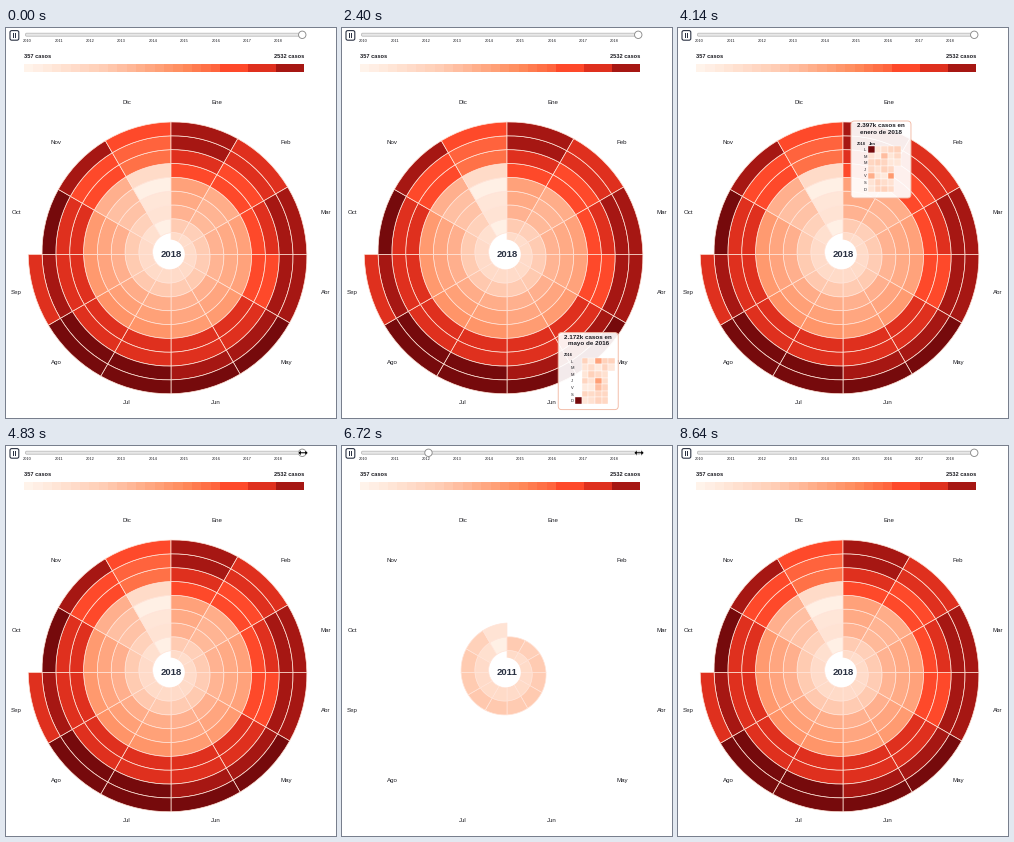
These frames come from a looping animation (330 px wide and 390 px high, 8670 ms). A matplotlib script:

```python
import random

import matplotlib.pyplot as plt
import numpy as np
from matplotlib.animation import FuncAnimation
from matplotlib.collections import PolyCollection
from matplotlib.colors import LinearSegmentedColormap
from matplotlib.patches import Circle, FancyBboxPatch, Polygon, Rectangle
from matplotlib.transforms import Affine2D

W, H, DPI = 330, 390, 100
STEP, FRAMES = 30, 289
PX = 72 / DPI
CX, CY = 165, 226.4
R0, PITCH = 21.7, 13.84
TOTAL = 105  # months from January 2010 to September 2018
INK, NAVY = "#1c1c22", "#2a3142"

MONTHS = ["enero", "febrero", "marzo", "abril", "mayo", "junio", "julio",
          "agosto", "septiembre", "octubre", "noviembre", "diciembre"]
HEAT = LinearSegmentedColormap.from_list("heat", [
    (0, "#fff3ea"), (3 / 11, "#ffcbb2"), (6 / 11, "#ff8a5a"), (8 / 11, "#ff4a2a"),
    (9 / 11, "#e0301e"), (10 / 11, "#a61713"), (1, "#760a0c")])

fig = plt.figure(figsize=(W / DPI, H / DPI), dpi=DPI, facecolor="white")
ax = fig.add_axes([0, 0, 1, 1])
ax.set_xlim(0, W)
ax.set_ylim(H, 0)
ax.axis("off")


def month_days(i):
    year, m = divmod(i, 12)
    if m == 1:
        return 29 if year % 4 == 2 else 28
    return 30 if m in (3, 5, 8, 10) else 31


def heat_level(i):
    """Yearly growth, a summer peak, a December drop, scaled by month length."""
    year, m = divmod(i, 12)
    base = np.interp(year, [0, 2, 4, 5, 6, 7, 8],
                     [1.8, 4.2, 5.1, 8.6, 8.82, 10.1, 10.6])
    season = 0.08 * year * np.cos(np.pi * (m - 7) / 6)
    drop = 1.5 + 3 * np.exp(-((year - 3) / 1.3) ** 2)
    winter = drop * max(0, (m - 7) / 4) ** 5
    unfinished = 0.8 if i == TOTAL - 1 else 1
    level = (base + season - winter) * month_days(i) / 30.4 * unfinished
    return float(np.clip(level, 0.3, 11))


def shade(level):
    level = np.asarray(level, float)
    return HEAT(np.where(level < 7.5, level, np.round(level)) / 11)


def label(x, y, s, size, **kw):
    style = dict(fontsize=size * PX, color=INK, family="Liberation Sans",
                 ha="center", va="baseline")
    style.update(kw)
    return ax.text(x, y, s, **style)


def rounded(x, y, w, h, r, **kw):
    style = f"round,pad=0,rounding_size={r}"
    return ax.add_patch(FancyBboxPatch((x, y), w, h, boxstyle=style, **kw))


def polar(r, a):
    return CX + r * np.sin(a), CY - r * np.cos(a)


def spiral_cell(i):
    t = np.linspace(i, i + 1, 9) / 12
    outer = R0 + PITCH * t
    r = np.concatenate([outer, outer[::-1] - PITCH])
    a = 2 * np.pi * np.concatenate([t, t[::-1]])
    return np.column_stack(polar(r, a))


def box(x, y, size):
    return [(x, y), (x + size, y), (x + size, y + size), (x, y + size)]


# Slider
rounded(4, 2.6, 8.8, 9.6, 1.8, fc="white", ec=NAVY, lw=1.1 * PX)
for x in (6.5, 9.2):
    ax.add_patch(Rectangle((x, 5), 1.1, 4.8, fc=NAVY, lw=0))
rounded(19.5, 5.2, 279, 3, 1.2, fc="#e8e8e8", ec="#b9b9b9", lw=0.8 * PX)
for k in range(9):
    label(21.5 + 31.4 * k, 14, str(2010 + k), 4)
knob = ax.add_patch(Circle((296, 6.8), 3.7, fc="white", ec="#8c8c8c",
                           lw=0.9 * PX, zorder=4))

# Legend
label(17.5, 30.4, "357 casos", 5.7, ha="left", weight="bold")
label(298.5, 30.4, "2532 casos", 5.6, ha="right", weight="bold")
BARS = 30
for k in range(BARS):
    w = 280 / BARS
    ax.add_patch(Rectangle((18 + k * w, 36.4), w, 7.6, lw=0, antialiased=False,
                           fc=shade(10.4 * k / (BARS - 1))))

# Spiral
levels = [heat_level(i) for i in range(TOTAL)]
cell_shapes = [spiral_cell(i) for i in range(TOTAL)]
cell_colors = shade(levels)
spiral = PolyCollection(cell_shapes, facecolors=cell_colors,
                        edgecolors="#ffe4d8", linewidths=0.7 * PX, zorder=2)
ax.add_collection(spiral, autolim=False)
ax.add_patch(Circle((164, CY), 14.8, fc="white", lw=0, zorder=3))
year_text = label(CX, 228.6, "2018", 9.5, weight="bold", color=NAVY, zorder=4)

for m, name in enumerate(MONTHS):
    x, y = polar(155, np.radians(15 + 30 * m))
    label(x, y - 0.5, name[:3].title(), 6.1, ha="left" if m < 6 else "right")

# Resize cursor
half = np.array([(5, 0), (2, -3), (2, -0.8), (-2, -0.8), (-2, -3), (-5, 0)])
ARROW = np.concatenate([half, -half[1:-1]])
cursor = ax.add_patch(Polygon(ARROW, fc="black", ec="white", lw=0.5 * PX, zorder=5))

# Tooltip, built at the origin and shifted into place
shift = Affine2D()
tip = dict(transform=shift + ax.transData, zorder=7)
panel = rounded(0, 0, 60, 77, 3.5, fc=(1, 1, 1, 0.92), ec="#f2b9a4",
                lw=0.9 * PX, **tip)
title = [label(30, y, "", 6.3, weight="bold", **tip) for y in (6.2, 12.8)]
tip_year = label(10, 23.5, "", 4, weight="bold", **tip)
tip_month = label(20, 23.5, "", 4, weight="bold", **tip)
letters = [label(14, 30 + 6.6 * k, c, 4, **tip) for k, c in enumerate("LMMJVSD")]
days = PolyCollection([box(0, 0, 1)], edgecolors="white", linewidths=0.4 * PX,
                      **tip)
ax.add_collection(days, autolim=False)
tip_parts = [panel, tip_year, tip_month, days] + title + letters


def hovered(r, a):
    turn = a / (2 * np.pi) % 1
    ring = np.ceil((r - R0) / PITCH - turn)
    i = int(np.clip(ring, 0, 8)) * 12 + int(turn * 12)
    return i if i < TOTAL else i - 12


def fill_tip(i):
    year, m = 2010 + i // 12, i % 12
    cases = round(357 + 2175 * (levels[i] / 11) ** 0.9)
    title[0].set_text(f"{cases // 1000}.{cases % 1000:03d}k casos en")
    title[1].set_text(f"{MONTHS[m]} de {year}")
    tip_year.set_text(str(year))
    tip_month.set_text({0: "Jan", 1: "Feb"}.get(m, ""))
    tip_month.set_x(21 if m == 0 else 53)

    rng = random.Random(i)
    first = (4 + sum(month_days(k) for k in range(i))) % 7
    verts, heat = [], []
    for d in range(month_days(i)):
        col, row = divmod(first + d, 7)
        verts.append(box(17 + 6.6 * col, 25.2 + 6.6 * row, 6.6))
        busy = row < 5 and rng.random() < 0.12
        heat.append(11 if d == 0 else rng.uniform(0.5, 2.6) + 3 * busy)
    days.set_verts(verts)
    days.set_facecolor(shade(heat))


def slider_years(ms):
    if ms < 6450:
        return min(8.75, 1 / 12 + 1.5 * np.exp((5220 - ms) / 106))
    u = min((ms - 6450) / 870, 1)
    return 1 / 12 + (8.75 - 1 / 12) * u * u * (3 - 2 * u)


def update(frame):
    ms = frame * STEP

    t = slider_years(ms)
    n = max(1, int(t * 12 + 1e-6))
    spiral.set_verts(cell_shapes[:n])
    spiral.set_facecolor(cell_colors[:n])
    year_text.set_text(str(2010 + (n - 1) // 12))
    knob.center = (21.5 + 31.4 * t, 6.8)

    cursor.set_visible(4620 <= ms <= 7560)
    x = np.interp(ms, [4980, 5190, 6000, 6300, 6420], [297, 22, 22, 311, 297])
    cursor.set_xy(ARROW + (x, 6.8))

    # The pointer circles the chart, pausing once over February
    shown = 240 <= ms <= 4270
    for part in tip_parts:
        part.set_visible(shown)
    if shown:
        a = np.radians(np.interp(ms, [240, 1380, 1680, 3030, 4140],
                                 [140, 33.9, 33.9, 249, 366.2]))
        r = np.interp(ms, [1380, 3030, 4140], [104.1, 110.4, 120.1])
        x, y = polar(r, a)
        shift.clear().translate(x - 5, y - 14)
        fill_tip(hovered(r, a))
    return []


anim = FuncAnimation(fig, update, frames=FRAMES, interval=STEP, repeat=True,
                     repeat_delay=0, blit=False)
plt.show()
```
